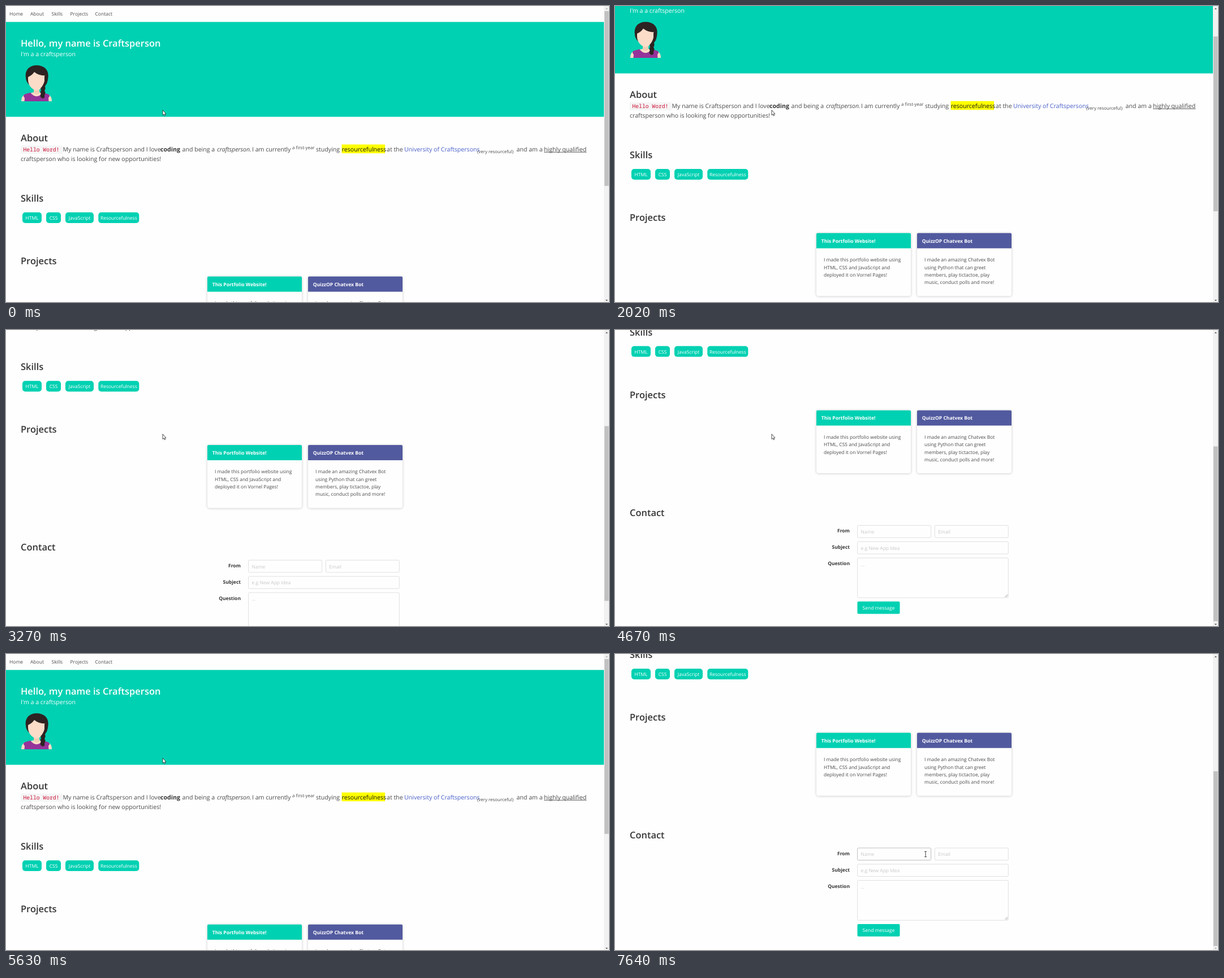
Animation of 1066x525 px, one loop 7.68 s. Source, as an HTML page with a canvas:

```html
<!DOCTYPE html>
<html lang="en">
<head>
<meta charset="utf-8">
<title>Portfolio page</title>
<style>
html, body { margin: 0; width: 100%; height: 100%; overflow: hidden; background: #fefefe; }
canvas { display: block; }
</style>
</head>
<body>
<canvas id="stage" width="1066" height="525"></canvas>
<script>
const ctx = document.getElementById('stage').getContext('2d');
const LOOP = 7680, WIDTH = 1066, HEIGHT = 525, VIEW = 1057, MAX_SCROLL = 340;
const TEAL = '#00d1b2', PURPLE = '#525a9f', PAPER = '#fefefe';
const INK = '#4a4a4a', DARK = '#363636', SKIN = '#fbdcc8', HAIR = '#2d2322', SHIRT = '#96339a';
const FONT_SCALE = { 400: 0.955, 600: 0.925, 700: 0.96 };

// Wheel bursts: first change, last change, scroll before, scroll after
const BURSTS = [
  [1410, 1610, 0, 52.6],
  [1900, 2140, 52.6, 105],
  [2340, 2590, 105, 157.6],
  [2820, 3040, 157.6, 263],
  [3220, 3390, 263, MAX_SCROLL],
  [4670, 5420, MAX_SCROLL, 76.5],
  [5460, 5630, 76.5, 0],
];

function scrollAt(t) {
  if (t >= 7640) return MAX_SCROLL;
  let pos = 0;
  for (const [start, end, from, to] of BURSTS) {
    if (t < start) break;
    if (t >= end) { pos = to; continue; }
    if (end - start > 500) {
      // Continuous wheel turning runs at an even speed
      return 337.4 - Math.floor((t - 4660) / 40) * 40 * 0.3436;
    }
    const held = Math.floor((t - start) / 40) * 40;
    const u = ((held + 25) / (end - start + 25)) ** 1.23;
    return from + (to - from) * u * u * (3 - 2 * u);
  }
  return pos;
}

function text(str, x, y, { size = 8.9, weight = 400, color = INK, align = 'left', style = '' } = {}) {
  ctx.font = `${style} ${weight} ${size * FONT_SCALE[weight]}px "Open Sans", sans-serif`;
  ctx.fillStyle = color;
  ctx.textAlign = align;
  ctx.fillText(str, x, y);
}

function rect(x, y, w, h, color) {
  ctx.fillStyle = color;
  ctx.fillRect(x, y, w, h);
}

function round(x, y, w, h, radius, fill, stroke) {
  ctx.beginPath();
  ctx.roundRect(x, y, w, h, radius);
  if (fill) { ctx.fillStyle = fill; ctx.fill(); }
  if (stroke) { ctx.strokeStyle = stroke; ctx.lineWidth = 0.8; ctx.stroke(); }
}

function shape(path, color) {
  ctx.fillStyle = color;
  ctx.fill(new Path2D(path));
}

const heading = (str, y) => text(str, 26, y, { size: 17.8, weight: 600, color: DARK });

function drawAvatar() {
  // Back hair, body, shirt, neck, face, braid
  shape('M35 127C33 113 42 105.3 54 105.3C67 105.3 76 113 74.5 126Q74 135 69 141L40 139Q35 133 35 127Z', HAIR);
  shape('M27 169Q27 160 33 157L49 153H59L75 157Q81 160 81 169Z', SKIN);
  shape('M32.5 169L33 163Q29 159 33 156.5L43 153.5Q54 167 65 153.5L75 156.5Q79 159 75 163L75.5 169Z', SHIRT);
  shape('M49 144H59V154Q54 159 49 154Z', '#f2cdb6');
  shape('M39 126Q46 123 50 117Q57 123 69 123.5V131C69 142 60 149.5 54 149.5C48 149.5 39 142 39 131Z', SKIN);
  shape('M68 124L74 126Q74 137 69 142Q70.5 147 68 150Q71 154 68 158Q69.5 163 65 164Q61 163 60.5 159Q62.5 155 60.5 153Q63 149 61 146Q66 141 68 133Z', HAIR);
}

function drawHero() {
  ['Home', 'About', 'Skills', 'Projects', 'Contact'].forEach((label, i) =>
    text(label, [6, 43, 80.5, 113.5, 157.5][i], 17.2));
  rect(0, 28.3, VIEW, 168.2, TEAL);
  text('Hello, my name is Craftsperson', 26, 72, { size: 17.8, weight: 600, color: '#fff' });
  text("I'm a a craftsperson", 26, 89, { size: 11.1, color: '#fff' });
  drawAvatar();
}

function drawAbout() {
  const y = 258, size = 11.1;
  const say = (str, x, options) => text(str, x, y, { size, ...options });
  heading('About', 240);
  rect(26, 247.5, 74, 14.5, '#f5f5f5');
  ctx.font = '9.7px "Noto Sans Mono", monospace';
  ctx.fillStyle = '#cc0f35';
  ctx.textAlign = 'left';
  ctx.fillText('Hello Word!', 30.5, y);
  say('My name is Craftsperson and I love', 100.5);
  say('coding', 273, { weight: 700, color: DARK });
  say('and being a', 311.5);
  say('craftsperson.', 373, { style: 'italic' });
  say('I am currently', 435);
  text('a first-year', 506, 254, { size: 8.3 });
  say('studying', 548);
  rect(593.5, 245.6, 76.5, 15.6, '#ff0');
  say('resourcefulness', 593.7, { color: '#111' });
  say('at the', 673);
  say('University of Craftspersons', 704, { color: '#485fc7' });
  text('(very resourceful)', 833, 261, { size: 8.3 });
  say('and am a', 902.5);
  say('highly qualified', 951);
  rect(951, 258.8, 75.5, 0.9, INK);
  text('craftsperson who is looking for new opportunities!', 26, 274.5, { size });
}

function drawSkills() {
  heading('Skills', 347);
  const tags = [['HTML', 29, 34], ['CSS', 71, 26], ['JavaScript', 105, 50], ['Resourcefulness', 163.3, 72]];
  for (const [label, x, w] of tags) {
    round(x, 366, w, 19, 5, TEAL);
    text(label, x + w / 2, 379, { color: '#fff', align: 'center' });
  }
}

function drawCard(x, color, title, lines) {
  ctx.save();
  ctx.shadowColor = 'rgba(10,10,10,.22)';
  ctx.shadowBlur = 4;
  ctx.shadowOffsetY = 0.5;
  round(x, 479.8, 167, 111.7, [2, 2, 4, 4], PAPER);
  ctx.restore();
  round(x, 479.8, 167, 27, [2, 2, 0, 0], color);
  text(title, x + 8.7, 496.7, { weight: 700, color: '#fff' });
  lines.forEach((line, i) => text(line, x + 13, 530.2 + i * 13.35));
}

function drawProjects() {
  heading('Projects', 458);
  drawCard(356, TEAL, 'This Portfolio Website!', [
    'I made this portfolio website using', 'HTML, CSS and JavaScript and', 'deployed it on Vornel Pages!']);
  drawCard(534, PURPLE, 'QuizzOP Chatvex Bot', [
    'I made an amazing Chatvex Bot', 'using Python that can greet', 'members, play tictactoe, play',
    'music, conduct polls and more!']);
}

function drawField(x, y, w, h, hint, hovered) {
  round(x, y, w, h, 2, PAPER, hovered ? '#acacac' : '#d9d9d9');
  text(hint, x + 6, y + 14.4, { color: '#c8c8c8' });
}

function drawContact(hovered) {
  heading('Contact', 667);
  [['From', 696.7], ['Subject', 725.6], ['Question', 754.5]].forEach(([label, y]) =>
    text(label, 415, y, { weight: 700, color: DARK, align: 'right' }));
  drawField(428.6, 684, 130, 21.7, 'Name', hovered);
  drawField(565.3, 684, 130, 21.7, 'Email');
  drawField(428.6, 712.8, 266.7, 21.7, 'e.g New App Idea');
  drawField(428.6, 741.6, 266.7, 70.7, '...');
  ctx.strokeStyle = '#777';
  ctx.lineWidth = 0.7;
  ctx.beginPath();
  for (const d of [2, 4.5]) {
    ctx.moveTo(694 - d, 811);
    ctx.lineTo(694, 811 - d);
  }
  ctx.stroke();
  round(428.5, 819, 75, 22, 2, TEAL);
  text('Send message', 466, 833.2, { color: '#fff', align: 'center' });
}

function drawArrow(y, direction, enabled) {
  ctx.fillStyle = enabled ? '#505050' : '#a8a8a8';
  ctx.beginPath();
  ctx.moveTo(1059.8, y - direction);
  ctx.lineTo(1064, y - direction);
  ctx.lineTo(1061.9, y + direction * 1.3);
  ctx.fill();
}

function drawScrollbar(scroll) {
  rect(VIEW, 0, WIDTH - VIEW, HEIGHT, '#f1f1f1');
  rect(1058, 9 + scroll * 199 / MAX_SCROLL, 7.5, 310, '#c1c1c1');
  drawArrow(4.8, -1, scroll > 0);
  drawArrow(522, 1, scroll < MAX_SCROLL);
}

function drawPointer(x, y) {
  ctx.save();
  ctx.translate(x, y);
  const arrow = new Path2D('M0 0V9L2 7.2L3.3 10.2L4.7 9.6L3.5 6.7H5.9Z');
  ctx.fillStyle = '#fff';
  ctx.fill(arrow);
  ctx.strokeStyle = '#222';
  ctx.lineWidth = 0.8;
  ctx.stroke(arrow);
  ctx.restore();
}

function drawTextCursor(x, y) {
  ctx.strokeStyle = '#333';
  ctx.lineWidth = 0.9;
  ctx.stroke(new Path2D(`M${x - 2} ${y - 4.7}H${x + 2}M${x} ${y - 4.7}V${y + 4.7}M${x - 2} ${y + 4.7}H${x + 2}`));
}

function draw(t) {
  const scroll = scrollAt(t);
  const overField = t >= 7640;
  ctx.textRendering = 'geometricPrecision';
  rect(0, 0, WIDTH, HEIGHT, PAPER);
  ctx.save();
  ctx.translate(0, -scroll);
  drawHero();
  drawAbout();
  drawSkills();
  drawProjects();
  drawContact(overField);
  ctx.restore();
  drawScrollbar(scroll);
  if (overField) drawTextCursor(549, 355);
  else if (t >= 7070) drawPointer(768, 314.5);
  else drawPointer(277, 184.6);
}

const began = performance.now();
function tick() {
  draw((performance.now() - began) % LOOP);
  requestAnimationFrame(tick);
}
tick();
</script>
</body>
</html>
```
